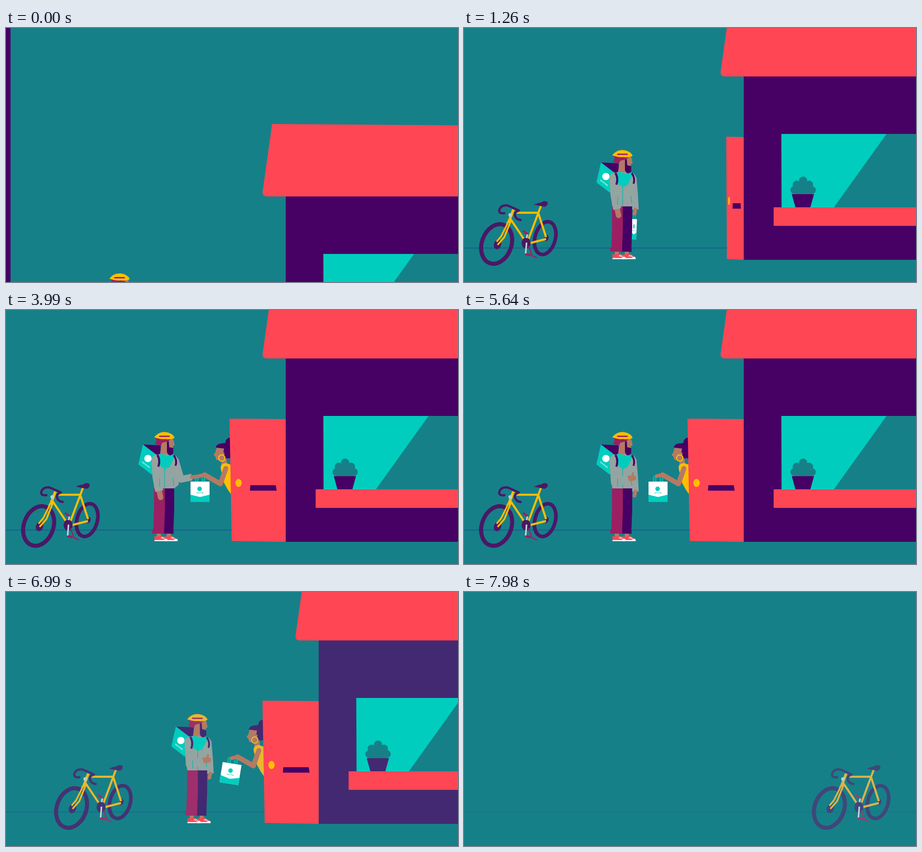
Write an HTML page that moves like this. It is 997x561 px and loops after 8000 ms.

```html
<!DOCTYPE html>
<html lang="en">
<head>
<meta charset="utf-8">
<title>Doorstep delivery</title>
<style>
  html, body { margin: 0; width: 100%; height: 100%; overflow: hidden; background: #168088; }
  svg { display: block; width: 100vw; height: 100vh; }
  .wall { fill: var(--wall); }
  .bikeFill { fill: var(--bike); }
  .red { fill: #ff4655; }
  .teal { fill: #168088; }
  .aqua { fill: #00cdbd; }
  .yellow { fill: var(--yellow); }
  .plum { fill: var(--plum); }
  .skin { fill: #b47a64; }
  .grey { fill: #94a4a1; }
  .white { fill: #fff; }
  .line { fill: none; stroke-linejoin: round; }
  .round { stroke-linecap: round; }
  text { font-family: Inter, Arial, sans-serif; font-weight: 700; text-anchor: middle; }
</style>
</head>
<body>
<svg viewBox="0 0 997 561" preserveAspectRatio="none">
  <defs>
    <g id="shoe">
      <rect class="skin" x="-4" y="-2" width="9" height="10"/>
      <path class="red" d="M-9 5Q-3 8 5 4L13 9Q20 11 20 16H-9Z"/>
      <path class="white" d="M-9 14H12Q15 10 19 12Q21 14 20 16.500H-9Z"/>
      <path class="line" stroke="#fff" stroke-width="1.500" d="M5 10l4-3M8 11l4-3M11 12l3-2"/>
    </g>
  </defs>
  <g id="camera">
    <path class="line" stroke="var(--ground)" stroke-width="3" d="M0 486H997"/>
    <g id="scene">
      <g id="bicycle">
        <g class="line" stroke="var(--bike)">
          <ellipse rx="32.500" ry="45" stroke-width="9" transform="translate(72 477) rotate(20)"/>
          <ellipse rx="22.500" ry="37" stroke-width="8" transform="translate(179 464) rotate(15)"/>
        </g>
        <g class="bikeFill">
          <ellipse rx="8" ry="11" transform="translate(74 478) rotate(20)"/>
          <ellipse rx="4.500" ry="7" transform="translate(182 464) rotate(15)"/>
        </g>
        <g class="line" stroke="var(--yellow)" stroke-width="4.500">
          <path d="M109 401L98 430" stroke-width="6"/>
          <path d="M112 408H166M102 421L134 469M170 392L164 408L141 470M164 409L181 462M142 476L181 466"/>
          <path d="M97 428L94 436L82 460L72 472M104 424L89 462L74 479" stroke-width="3.800"/>
        </g>
        <ellipse class="bikeFill" cx="137" cy="475" rx="10" ry="12"/>
        <g class="line round" stroke="var(--bike)" stroke-width="5">
          <path d="M89 409Q76 411 78 401Q82 390 96 392Q106 396 121 403"/>
          <path d="M119 404Q110 407 113 416Q116 423 125 424"/>
        </g>
        <circle cx="102" cy="413" r="4" fill="#b9cfd0"/>
        <path class="bikeFill" d="M154 390Q164 386 171 385Q176 380 184 384Q187 391 178 395Q167 393 154 390Z"/>
        <g class="line" stroke="var(--plum)">
          <path d="M130 448L141 456" stroke-width="4.500"/>
          <path d="M142 482L150 503L161 508" stroke-width="2.500"/>
          <path d="M135 499L147 502" stroke-width="5"/>
        </g>
        <path class="line" stroke="#c3d3d6" stroke-width="3.500" d="M140 456L138 464M138 474L136 498"/>
      </g>

      <g id="bag">
        <path class="line" stroke="#00b9ac" stroke-width="3" d="M-10 13V4Q-9 0-5 0M10 13V4Q9 0 5 0M-5 13V3M5 13V3"/>
        <rect class="white" x="-21" y="12" width="42" height="45"/>
        <path class="aqua" d="M-21 41L0 46L21 41V57H-21Z"/>
        <circle class="aqua" cx="-1" cy="28" r="5"/>
        <text class="aqua" y="38" font-size="3.500">tavorindo</text>
      </g>

      <g id="courier">
        <path id="farArm" class="line" stroke="#94a4a1" stroke-width="15"/>
        <path id="farHand" class="line round" stroke="#b47a64" stroke-width="8"/>
        <path id="farLeg" class="line" stroke="var(--wall)" stroke-width="21"/>
        <g id="farFoot"><use href="#shoe"/><rect class="wall" x="-12" y="-8" width="23" height="8"/></g>
        <path id="nearLeg" class="line" stroke="var(--plum)" stroke-width="24"/>
        <g id="nearFoot"><use href="#shoe"/><rect class="plum" x="-14" y="-8" width="26" height="8"/></g>

        <path class="wall" d="M302 297L341 299V322L334 323Z"/>
        <path class="aqua" d="M302 297L335 322L322 364L292 341Z"/>
        <circle class="white" cx="313" cy="328" r="8"/>
        <text class="white" font-size="4.500" transform="translate(308 343) rotate(38)">tavorindo</text>

        <path class="skin" d="M344 291H357V322H339Z"/>
        <path class="grey" d="M330 320L340 318L371 320Q379 324 380 332L381 386L371 394H327L321 334Q321 322 330 320Z"/>
        <path class="aqua" d="M337 321L342 317L354 321L371 320L371 326L360 348L350 351L337 343Z"/>
        <path class="line" stroke="#00b9ac" stroke-width="1.300" d="M350 350V393M368 370L370 387"/>
        <path class="line" stroke="var(--wall)" stroke-width="4" d="M370 321Q378 331 374 344"/>

        <path class="skin" d="M354 285L369 285L372 299L368 301L369 307H355Z"/>
        <path class="wall" d="M355 290H359L360 303L369 305V315Q367 321 361 321Q356 319 355 313Z"/>
        <path class="plum" d="M330 282L365 284L358 290L345 293L341 300L329 296L332 288Z"/>
        <circle class="skin" cx="348" cy="299" r="5"/>
        <path class="yellow" d="M327 281Q336 269 350 269.500Q367 271 372 282Q366 287 352 285Q338 286 327 281Z"/>
        <path class="line round" stroke="var(--plum)" stroke-width="3" d="M339 279H360"/>

        <path id="nearHand" class="line round" stroke="#b47a64" stroke-width="12"/>
        <path id="thumb" class="line round" stroke="#b47a64" stroke-width="4" d="M371 366L373 360"/>
        <path id="nearArm" class="line" stroke="#94a4a1" stroke-width="18"/>
        <path class="line" stroke="#00b9ac" stroke-width="1.300" d="M339 372V390"/>
        <path class="line" stroke="var(--wall)" stroke-width="4.500" d="M334 320Q341 332 336 346"/>
      </g>

      <g id="customer">
        <circle class="wall" cx="494" cy="292" r="10"/>
        <path class="skin" d="M465 302H484L488 344L474 346L476 333L464 331L462 324L458 320L462 314Z"/>
        <path class="wall" d="M463 304Q463 297 473 295L497 292V327L483 328L479 316L481 306Z"/>
        <circle class="skin" cx="478" cy="318" r="4"/>
        <path id="top" class="yellow"/>
        <path id="herHand" class="line round" stroke="#b47a64" stroke-width="8"/>
        <path id="herArm" class="line round" stroke="#b47a64" stroke-width="11"/>
        <circle class="line" cx="476" cy="327" r="7" stroke="var(--yellow)" stroke-width="2.300"/>
      </g>

      <g id="house">
        <rect class="wall" x="617" y="100" width="900" height="412"/>
        <path class="red" d="M587-53L1517-46V107H576Q565 107 566 97Z"/>
        <rect class="teal" x="700" y="234" width="800" height="163"/>
        <path id="glare" class="aqua"/>
        <path class="wall" d="M723 367H772L764 396H731Z"/>
        <g class="teal">
          <circle cx="748" cy="337" r="9"/><circle cx="734" cy="346" r="9"/><circle cx="761" cy="346" r="9"/>
          <circle cx="729" cy="358" r="9"/><circle cx="767" cy="358" r="9"/><rect x="729" y="343" width="38" height="24"/>
        </g>
        <rect class="red" x="683" y="396" width="830" height="41"/>
      </g>
      <g id="door">
        <path class="red" d="M493 240L617 241V512L498 510Z"/>
        <ellipse fill="#ffbd00" cx="513" cy="382" rx="7" ry="9"/>
        <path fill="#470064" d="M539 387H595L597 399H538Z"/>
      </g>
    </g>
  </g>
  <rect id="post" class="wall" y="0" height="561"/>
</svg>
<script>
const LOOP = 8000, STEP = 30;
const $ = id => document.getElementById(id);
const clamp = u => Math.min(1, Math.max(0, u));
const smooth = u => u * u * (3 - 2 * u);
const ramp = (t, start, end) => smooth(clamp((t - start) / (end - start)));
const mix = (a, b, u) => a.map((v, i) => v + (b[i] - v) * u);
const place = (id, value) => $(id).setAttribute('transform', value);
const shape = (id, d) => $(id).setAttribute('d', d);
const show = (id, on) => $(id).style.visibility = on ? 'visible' : 'hidden';

// Each colour and the one it fades to during the final pan
const fades = {
  wall: [[71, 0, 100], [64, 71, 122]],
  bike: [[74, 24, 102], [64, 71, 122]],
  plum: [[156, 31, 99], [160, 58, 115]],
  yellow: [[255, 189, 0], [220, 178, 76]],
  ground: [[23, 104, 140], [22, 122, 136]]
};

// Arm poses: elbow, wrist, fingertips
const near = {
  rest: [332, 368, 338, 400, 341, 414],
  stride: [331, 374, 355, 387, 367, 394],
  thumbsUp: [333, 381, 362, 372, 374, 371]
};
const far = {
  rest: [376, 366, 378, 401, 376, 410],
  stride: [370, 374, 356, 395, 352, 403],
  offer: [386, 374, 410, 369, 428, 367]
};
const her = {
  rest: [490, 395, 491, 418, 492, 430],
  reach: [473, 384, 438, 364, 425, 367]
};

function drawArm(name, shoulder, [ex, ey, wx, wy, hx, hy]) {
  shape(name + 'Arm', `M${shoulder}L${ex} ${ey}L${wx} ${wy}`);
  shape(name + 'Hand', `M${wx} ${wy}L${hx} ${hy}`);
}

// swing: 1 is fully forward, -1 fully back
function drawLeg(name, hip, swing, pace) {
  const knee = [hip + pace * (12 + 6 * swing), 440 - 5 * pace];
  const ankle = [hip - 2 + pace * (21 * swing - 8), 494 - pace * (15.5 - 8.5 * swing)];
  shape(name + 'Leg', `M${hip} 392L${knee}L${ankle}`);
  place(name + 'Foot', `translate(${ankle}) rotate(${pace * 25 * (1 - swing)})`);
}

function drawCourier(t) {
  const pace = 1 - ramp(t, 540, 840);
  const swing = Math.cos(Math.PI * t / 540);
  const walk = -99 * (1 - clamp(t / 840)) ** 1.5;
  const bob = 7.5 * swing ** 2 * pace;
  const reach = -swing * pace;
  place('courier', `translate(${walk} ${bob})`);
  drawLeg('near', 338.5, swing, pace);
  drawLeg('far', 360.5, -swing, pace);

  const thumb = ramp(t, 4400, 5000);
  drawArm('near', '330 329', mix(mix(near.rest, near.stride, reach), near.thumbsUp, thumb));
  show('thumb', thumb > .9);

  const offer = ramp(t, 2700, 3400);
  const carried = mix(far.rest, far.stride, reach);
  drawArm('far', '373 330', mix(carried, far.offer, offer - ramp(t, 4050, 4650)));

  const grip = mix(carried, far.offer, offer).slice(4);
  const tilt = 2 + 26 * reach - 2 * offer + 19 * ramp(t, 6600, 7400);
  const width = .28 + .72 * Math.max(Math.abs(reach), offer);
  place('bag', `translate(${grip[0] + walk} ${grip[1] + bob}) rotate(${tilt}) scale(${width} 1)`);
}

function drawCustomer(t) {
  place('customer', `translate(${180 * (1 - ramp(t, 1250, 2100))} 0)`);
  const lean = ramp(t, 3100, 3800);
  drawArm('her', '485 350', mix(her.rest, her.reach, lean));
  shape('top', `M485 338Q471 340 ${472 + 2 * lean} 352L${471 + 10 * lean} 382` +
    `Q${480 + 8 * lean} ${388 + 8 * lean} ${494 + 3 * lean} ${386 + 22 * lean}V342Z`);

  const open = ramp(t, 1000, 1700);
  place('door', `translate(617 0) scale(${open} 1) translate(-617 0)`);
  show('door', open > 0);
}

function draw(t) {
  place('camera', `translate(0 ${265 * (1 - clamp(t / 918)) ** 3})`);
  place('scene', `translate(${734 * Math.max(0, (t - 5800) / 2180) ** 3.82} 0)`);

  const glare = -32 * (1 - clamp(t / 720));
  shape('glare', `M700 234H${932 + glare}L${816 + glare} 396H701Z`);
  $('post').setAttribute('width', 10 * (1 - clamp(t / 225)));

  const fade = 1 - (1 - clamp((t - 6450) / 1530)) ** 2;
  for (const [name, [from, to]] of Object.entries(fades))
    document.documentElement.style.setProperty('--' + name, `rgb(${mix(from, to, fade).map(Math.round)})`);

  drawCourier(t);
  drawCustomer(t);
}

function frame() {
  const t = performance.now() % LOOP;
  draw(Math.floor(t / STEP) * STEP);
  requestAnimationFrame(frame);
}
frame();
</script>
</body>
</html>
```
